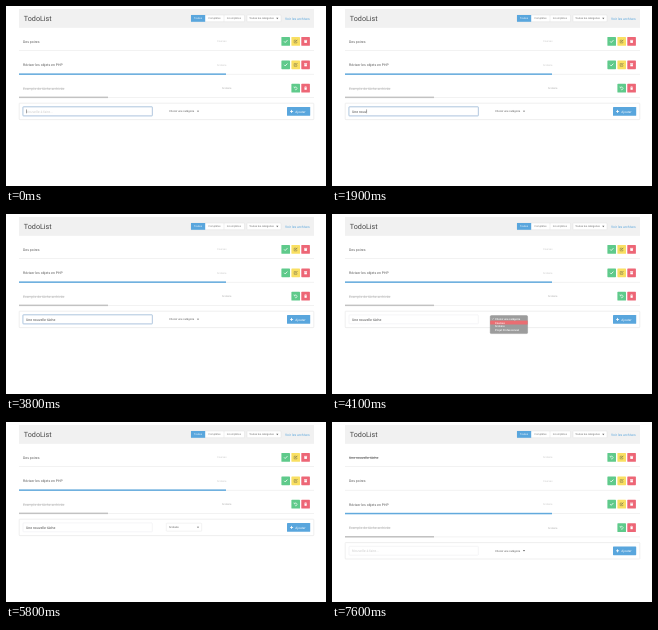
Animation, 320 px wide and 180 px high, one loop 9.2 s. Source, as an HTML page with a canvas:

```html
<!DOCTYPE html>
<html lang="fr">
<head>
<meta charset="utf-8">
<title>TodoList</title>
<style>
html, body { margin: 0; width: 100%; height: 100%; overflow: hidden; background: #fff; }
canvas { display: block; width: 320px; height: 180px; }
</style>
</head>
<body>
<canvas id="stage"></canvas>
<script>
const LOOP = 9200;
const canvas = document.getElementById('stage');
const ctx = canvas.getContext('2d');
const dpr = window.devicePixelRatio || 1;
canvas.width = 320 * dpr;
canvas.height = 180 * dpr;

const BLUE = '#59a6dd', GREEN = '#5fca8b', YELLOW = '#f9df62', RED = '#ed6676';
const TASK = 'Une nouvelle tâche';
const CHOICES = ['Choisir une catégorie', 'Courses', 'Scolaire', 'Projet Professionnel'];
const ROW = 23.4;

// [time, letters typed]
const KEYS = [[0, 0], [200, 1], [500, 2], [600, 3], [700, 4], [1600, 5], [1800, 7], [1900, 8],
  [2100, 9], [2200, 10], [2300, 11], [2400, 12], [2500, 14], [2900, 15],
  [3100, 16], [3200, 17], [3300, 18]];

function font(size, weight = 400) {
  ctx.font = `${weight} ${size}px Roboto, "Liberation Sans", sans-serif`;
}

function text(str, x, y, size, color, weight) {
  font(size, weight);
  ctx.fillStyle = color;
  ctx.fillText(str, x, y);
  return ctx.measureText(str).width;
}

function rect(x, y, w, h, color) {
  ctx.fillStyle = color;
  ctx.fillRect(x, y, w, h);
}

function round(x, y, w, h, r, fill, stroke, lw = 0.5) {
  ctx.beginPath();
  ctx.roundRect(x, y, w, h, r);
  if (fill) { ctx.fillStyle = fill; ctx.fill(); }
  if (stroke) { ctx.strokeStyle = stroke; ctx.lineWidth = lw; ctx.stroke(); }
}

function line(points, color, lw = 0.5) {
  ctx.beginPath();
  points.forEach(([x, y]) => ctx.lineTo(x, y));
  ctx.strokeStyle = color;
  ctx.lineWidth = lw;
  ctx.stroke();
}

function arrow(x, y) {
  ctx.beginPath();
  ctx.moveTo(x - 1.1, y - 0.6);
  ctx.lineTo(x + 1.1, y - 0.6);
  ctx.lineTo(x, y + 0.8);
  ctx.fillStyle = '#666';
  ctx.fill();
}

const icons = {
  check(x, y) {
    line([[x - 1.6, y], [x - 0.5, y + 1.1], [x + 1.7, y - 1.2]], '#fff', 0.8);
  },
  undo(x, y) {
    ctx.beginPath();
    ctx.arc(x, y + 0.2, 1.4, -2.6, 2.2);
    ctx.strokeStyle = '#fff';
    ctx.lineWidth = 0.6;
    ctx.stroke();
    line([[x - 1.7, y - 1.7], [x - 1.4, y - 0.4], [x - 0.2, y - 0.5]], '#fff', 0.6);
  },
  edit(x, y) {
    line([[x + 0.4, y - 1.2], [x - 1.5, y - 1.2], [x - 1.5, y + 1.5], [x + 1.2, y + 1.5], [x + 1.2, y + 0.3]], '#77704a', 0.5);
    line([[x - 0.4, y + 0.5], [x + 1.6, y - 1.6]], '#77704a', 0.8);
  },
  box(x, y) {
    rect(x - 1.5, y - 1.5, 3, 0.8, '#fff');
    rect(x - 1.3, y - 0.5, 2.6, 2, '#fff');
  },
  trash(x, y) {
    rect(x - 1.4, y - 1.4, 2.8, 0.5, '#fff');
    rect(x - 0.5, y - 1.8, 1, 0.4, '#fff');
    rect(x - 1.1, y - 0.7, 2.2, 2.3, '#fff');
  }
};

function button(x, y, color, icon) {
  round(x, y, 8.6, 8.8, 0.6, color);
  icons[icon](x + 4.3, y + 4.4);
}

function header() {
  rect(13, 3, 295, 18.8, '#f1f1f1');
  text('TodoList', 17.8, 15, 7.2, '#484848');
  round(185, 9, 53.5, 6.8, 0.6, '#fff', '#dcdcdc', 0.4);
  rect(185, 9, 14.2, 6.8, BLUE);
  line([[218, 9], [218, 15.8]], '#dcdcdc', 0.4);
  text('Toutes', 188.1, 13.4, 2.6, '#fff');
  text('Complètes', 202.2, 13.4, 2.6, '#777');
  text('Incomplètes', 220.7, 13.4, 2.6, '#777');
  round(241, 9, 34, 6.8, 0.6, '#fff', '#dcdcdc', 0.4);
  text('Toutes les catégories', 243.2, 13.4, 2.6, '#666');
  arrow(271.3, 12.4);
  text('Voir les archives', 279, 13.6, 3.4, BLUE);
}

function row(i, task) {
  const y = 23.4 + i * ROW;
  const color = task.archived ? '#b5b5b5' : '#5c5c5c';
  const w = text(task.name, 17, y + 13.3, 3.5, color);
  if (task.done) line([[17, y + 12.2], [17 + w, y + 12.2]], color, 0.4);
  text(task.label, task.archived ? 216 : 211, y + 13, 2.6, task.archived ? '#a8a8a8' : '#c6c6c6');
  const top = y + 7.6;
  if (task.archived) {
    button(285.4, top, GREEN, 'undo');
    button(295.3, top, RED, 'trash');
  } else {
    button(275.4, top, GREEN, task.done ? 'undo' : 'check');
    button(285.4, top, YELLOW, 'edit');
    button(295.3, top, RED, 'box');
  }
  rect(13, y + 21.1, 295, 0.5, '#e4e4e4');
  if (task.bar) rect(13, y + 20.6 - (task.archived ? 0.2 : 0), task.bar, 1.5, task.archived ? '#c2c2c2' : '#62aadd');
}

function input(y, value, focus, caret) {
  if (focus) round(17, y + 3.7, 129.3, 8.9, 0.6, '#fff', '#dbe8f4', 1.2);
  round(17, y + 3.7, 129.3, 8.9, 0.6, '#fff', focus ? '#8aa9cc' : '#ececf0', 0.55);
  let w = 0;
  if (value) w = text(value, 20, y + 9.5, 3.5, '#505050');
  else text('Nouvelle à faire...', 20, y + 9.5, 3.5, '#cdcdcd');
  if (caret) rect(20.1 + w, y + 6.2, 0.45, 3.9, '#444');
}

function form(y, s) {
  round(13.2, y, 294.6, 16.4, 0.5, '#fff', '#dedede', 0.5);
  input(y, s.value, s.focus, s.caret);
  if (s.ring) round(160.3, y + 4, 35.4, 8, 0.6, '#fff', '#e6e6e6', 0.5);
  text(s.choice, 163, y + 9.1, 2.7, '#5a5a5a');
  arrow(192, y + 8.1);
  round(281, y + 3.8, 23.2, 8.8, 0.6, BLUE);
  rect(284.1, y + 7.8, 3, 0.8, '#fff');
  rect(285.2, y + 6.7, 0.8, 3, '#fff');
  text('Ajouter', 289.3, y + 9.4, 3.2, '#fff');
}

function menu(active, alpha) {
  ctx.globalAlpha = alpha;
  round(158.2, 101.6, 37.4, 18, 1.2, '#9c9c9c', '#8c8c8c', 0.4);
  if (active >= 0) rect(158.2, 102.7 + active * 3.9, 37.4, 3.9, '#ea6d72');
  line([[160, 104.8], [160.6, 105.4], [161.7, 103.9]], '#fff', 0.4);
  CHOICES.forEach((c, i) => text(c, 163, 105.6 + i * 3.9, 2.65, '#fff', 500));
  ctx.globalAlpha = 1;
}

function draw(t) {
  ctx.setTransform(dpr, 0, 0, dpr, 0, 0);
  ctx.textRendering = 'geometricPrecision';
  rect(0, 0, 320, 180, '#fff');
  header();

  const added = t >= 6000;
  const tasks = [
    { name: 'Des poires', label: 'Courses' },
    { name: 'Réviser les objets en PHP', label: 'Scolaire', bar: 207 },
    { name: 'Exemple de tâche archivée', label: 'Scolaire', bar: 89, archived: true, done: true }
  ];
  if (added) tasks.unshift({ name: TASK, label: 'Scolaire', done: t >= 7600 });
  tasks.forEach((task, i) => row(i, task));

  const [keyTime, count] = added ? [6000, 0] : KEYS.filter(k => k[0] <= t).pop();
  const focus = t < 4100 || (added && t < 7500);
  form(added ? 120.6 : 97.2, {
    value: TASK.slice(0, count),
    focus,
    caret: focus && (t - keyTime) % 1000 < 500,
    choice: t >= 4800 && !added ? CHOICES[2] : CHOICES[0],
    ring: t >= 5800 && t < 7500
  });

  if (t >= 4100 && t < 5000) {
    const active = t < 4400 ? 1 : t < 4800 ? 2 : -1;
    menu(active, t < 4900 ? 1 : 0.45);
  }
}

const start = performance.now();
function tick() {
  draw((performance.now() - start) % LOOP);
  requestAnimationFrame(tick);
}
tick();
</script>
</body>
</html>
```
